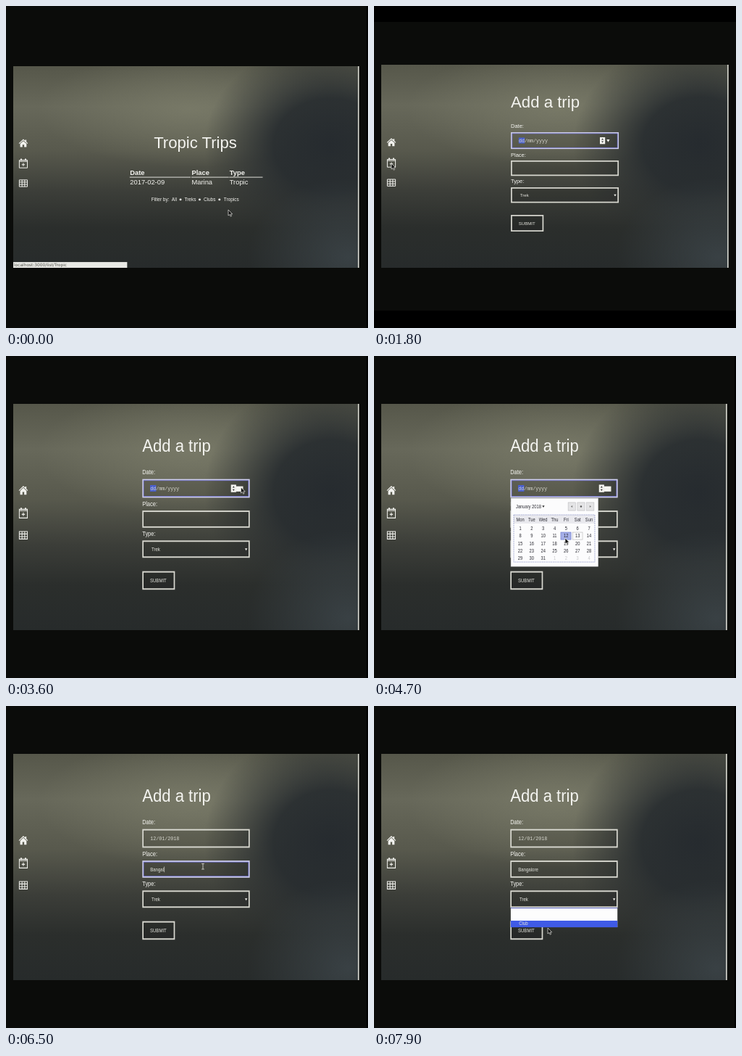
An HTML page for the animation above (8 s loop, 500 px wide and 444 px high).

```html
<!DOCTYPE html>
<html lang="en">
<head>
<meta charset="utf-8">
<title>Trip planner</title>
<style>
  html, body { margin: 0; width: 100%; height: 100%; overflow: hidden; background: #000; }
  svg { display: block; }
  text { font-family: "Liberation Sans", Arial, sans-serif; fill: #f4f4f0; white-space: pre; }
  .h1 { font-size: 22.2px; }
  .cell { font-size: 9.4px; }
  .head { font-size: 9.4px; font-weight: bold; }
  .small { font-size: 6.5px; }
  .label { font-size: 7.5px; }
  .value { font-size: 6.1px; fill: #e4e4de; }
  .mono { font: 6.7px "Liberation Mono", monospace; fill: #d6d6ce; }
  .status { font: 5.9px "DejaVu Sans", sans-serif; fill: #55564f; }
  .cal { font-size: 5.8px; fill: #2c2c34; }
  .mid { text-anchor: middle; }
  .box { fill: rgba(0,0,0,.1); stroke: #d9d9d1; stroke-width: 1.7; }
  .box.focus { stroke: #cfcfec; }
  .ring { fill: none; stroke: #6f70d2; stroke-width: .7; }
</style>
</head>
<body>
<svg width="500" height="444" viewBox="0 0 500 444">
  <defs>
    <linearGradient id="base" x2="0" y2="1">
      <stop offset="0" stop-color="#56574a"/><stop offset=".2" stop-color="#67685a"/>
      <stop offset=".42" stop-color="#58594d"/><stop offset=".62" stop-color="#3c3e39"/>
      <stop offset=".8" stop-color="#2b2e2c"/><stop offset="1" stop-color="#272b2b"/>
    </linearGradient>
    <radialGradient id="glow">
      <stop offset="0" stop-color="#7d7e6b" stop-opacity=".75"/>
      <stop offset="1" stop-color="#7d7e6b" stop-opacity="0"/>
    </radialGradient>
    <radialGradient id="shade">
      <stop offset="0" stop-color="#262b2f"/><stop offset=".45" stop-color="#272c2f" stop-opacity=".92"/>
      <stop offset="1" stop-color="#2a2e2f" stop-opacity="0"/>
    </radialGradient>
    <radialGradient id="cool">
      <stop offset="0" stop-color="#3b4347" stop-opacity=".9"/>
      <stop offset="1" stop-color="#3b4347" stop-opacity="0"/>
    </radialGradient>
  </defs>
  <rect id="back" width="500" height="444" fill="#0b0c0a"/>
  <svg id="video" viewBox="0 0 480 280" preserveAspectRatio="none">
    <rect width="480" height="280" fill="url(#base)"/>
    <ellipse cx="245" cy="60" rx="210" ry="80" fill="url(#glow)"/>
    <ellipse cx="440" cy="110" rx="175" ry="145" fill="url(#shade)"/>
    <ellipse cx="465" cy="265" rx="140" ry="110" fill="url(#cool)"/>
    <path d="M478.8 0V280" stroke="#d2d2ca" stroke-width="1.6"/>
    <g fill="#f2f2ee">
      <path d="M14 101.3L7.7 107l.8.8L14 103l5.500 4.800.8-.8-2.100-1.900V102.200h-1.700v1.400z"/>
      <path d="M14 103.900l-4.400 3.900v4.500h3.200v-3.300h2.400v3.300h3.200v-4.500z"/>
    </g>
    <g fill="none" stroke="#f2f2ee">
      <path d="M8.400 130.500h11.200v10.700H8.400zM8.400 132.200h11.200M14 134.500v4.400M11.800 136.700h4.400"/>
      <path d="M11 128.500v2.800M17 128.500v2.800" stroke-width="1.800"/>
      <path d="M8.400 158h11.200v9.300H8.400zM8.400 161h11.200M8.400 164.200h11.200M12.200 158v9.300M15.900 158v9.300"/>
    </g>
    <g id="list"></g>
    <g id="form"></g>
    <g id="calendar"></g>
    <g id="menu"></g>
    <g id="status">
      <rect y="272" width="158" height="8" fill="#e9e9e5"/>
      <text class="status" x="1" y="278">localhost:3000/list/Tropic</text>
    </g>
  </svg>
  <g id="cursor">
    <path id="arrow" d="M0 0V8L1.900 6.400 3.200 9.200 4.500 8.600 3.300 5.900H5.700Z" fill="#111" stroke="#e8e8e4" stroke-width=".7"/>
    <path id="beam" d="M-1.800-3.500H1.800M0-3.500V4M-1.800 4H1.800" fill="none" stroke="#d0d0ca" stroke-width=".9"/>
  </g>
</svg>
<script>
const $ = id => document.getElementById(id);
const text = (cls, x, y, s, id = '') => `<text class="${cls}" id="${id}" x="${x}" y="${y}">${s}</text>`;
const rect = (x, y, w, h, attrs) => `<rect x="${x}" y="${y}" width="${w}" height="${h}" ${attrs}/>`;
const field = (id, y, h, w = 147.3) => rect(179.9, y + .9, w, h - 1.8, `class="box" id="${id}"`);
const ring = (id, y, h) => rect(180.9, y + 1.9, 145.3, h - 3.8, `class="ring" id="${id}"`);

function buildList() {
  const cols = [['Date', '2017-02-09', 162, 246], ['Place', 'Marina', 247.500, 299], ['Type', 'Tropic', 300, 346]];
  const links = [['Filter by:', 191.5], ['All', 219.8], ['Treks', 237.5], ['Clubs', 264], ['Tropics', 292]];
  $('list').innerHTML = text('h1', 195, 114, 'Tropic Trips') +
    cols.map(([h, v, x, end]) => text('head', x, 151, h) + text('cell', x, 164.300, v) +
      `<path d="M${x - .5} 154.200H${end}" stroke="#e0e0da"/>`).join('') +
    links.map(([s, x]) => text('small', x, 187.2, s)).join('') +
    [232, 258.5, 286].map(x => `<circle cx="${x}" cy="185.200" r="1.500" fill="#f4f4f0"/>`).join('');
}

function buildForm() {
  $('form').innerHTML = text('h1', 179, 59, 'Add a trip') +
    text('label', 179, 87, 'Date:') + text('label', 179, 126.5, 'Place:') + text('label', 179, 163.3, 'Type:') +
    field('date', 93, 23.2) + ring('dateRing', 93, 23.2) +
    field('place', 132, 21.3) + ring('placeRing', 132, 21.3) +
    field('type', 169, 21.5) + field('submit', 207, 23, 43.5) +
    rect(189.8, 100.5, 8.4, 8, 'fill="#4a60cf" id="mark"') +
    text('mono', 190, 107, '', 'dateText') +
    `<g id="spin">${rect(302, 100, 7.2, 9.300, 'fill="#f4f4f0"')}
      <path d="M304 103.600l1.600-2 1.600 2zM304 105.600l1.600 2 1.600-2z" fill="#333"/>
      <path d="M311.300 103h4.200l-2.100 3.800z" fill="#f4f4f0"/></g>` +
    rect(309, 102, 9.8, 6.5, 'fill="#f4f4f0" id="hover"') +
    text('value', 190, 145, '', 'placeText') +
    '<path id="caret" d="M0 139.500V146.500" stroke="#e4e4de" stroke-width=".6"/>' +
    text('value', 191.8, 182, 'Trek') +
    '<path d="M321.300 178.800h3.400l-1.700 2.600z" fill="#f0f0ea"/>' +
    text('value', 189.700, 220.700, 'SUBMIT');
}

function buildCalendar() {
  const colX = i => 192.800 + 15.9 * i;
  const rowY = i => 156 + 9.33 * i;
  let s = rect(179.800, 116.7, 121.2, 84.5, 'fill="#fcfcfd" stroke="#b9b9bd" stroke-width=".5"') +
    text('cal', 186.800, 129, 'January 2018') + '<path d="M223.200 125.800h3.400l-1.700 2.600z" fill="#333"/>';
  [259.2, 272, 284.8].forEach((x, i) => {
    s += rect(x, 122, 10.3, 10, 'fill="#e4e4e6" stroke="#b4b4b8" stroke-width=".5"');
    s += i === 1 ? `<circle cx="${x + 5.1}" cy="127" r="1.200" fill="#555"/>`
      : `<path d="M${x + 5.1 + (i - 1) * 1.3} 127l${(1 - i) * 2.2}-1.400v2.800z" fill="#777"/>`;
  });
  s += rect(183.800, 137.3, 112.4, 10.7, 'fill="#e9e9ee"') +
    rect(183.800, 137.3, 112.4, 58.4, 'fill="none" stroke="#7f88c4" stroke-width=".7" stroke-dasharray="1.500 1"') +
    rect(249, 158.900, 14.2, 9, 'fill="#a5afe8" stroke="#6673c8" stroke-width=".6" id="pick"') +
    rect(265.6, 158.900, 13.6, 9, 'fill="none" stroke="#aaa" stroke-width=".5"');
  'Mon Tue Wed Thu Fri Sat Sun'.split(' ').forEach((d, i) => s += text('cal mid', colX(i), 145, d));
  for (let i = 0; i < 35; i++) {
    const day = i % 31 + 1;
    s += `<g opacity="${i > 30 ? .25 : 1}">${text('cal mid', colX(i % 7), rowY(Math.floor(i / 7)), day)}</g>`;
  }
  $('calendar').innerHTML = s;
}

function buildMenu() {
  $('menu').innerHTML = rect(179.6, 191, 148, 23.5, 'fill="#fdfdfd"') +
    rect(179.6, 206.4, 148, 8.2, 'fill="#3f5ae6" id="choice"') +
    text('value', 191, 212, 'Club', 'club') +
    '<path d="M179.600 190.800H327.600" stroke="#5b66d8" stroke-width=".8"/>';
}

// time, x, y
const path = [
  [0, 307, 281], [400, 307, 281], [600, 312, 350],
  [1200, 300, 345], [1600, 24, 217], [1900, 24, 217], [2300, 110, 205], [2700, 248, 208],
  [3100, 400, 118], [3200, 400, 118], [3600, 324.5, 181], [3700, 324.5, 181],
  [4100, 296, 226], [4200, 292, 230], [4500, 264, 251], [4800, 264, 251],
  [5100, 330, 124], [5400, 300, 216], [5500, 300, 216], [5700, 346, 232], [5800, 346, 232],
  [6000, 272, 221], [7000, 272, 221], [7100, 294, 226], [7300, 294, 226],
  [7600, 240, 272], [7700, 240, 272], [7900, 240, 306], [8000, 240, 306]
];
const typing = [[6100, 1], [6200, 2], [6300, 4], [6400, 5], [6500, 6], [6700, 7], [6800, 9]];

const show = (id, on) => $(id).style.display = on ? '' : 'none';

function cursorAt(t) {
  const i = path.findIndex(p => p[0] > t);
  const [t0, x0, y0] = path[i - 1], [t1, x1, y1] = path[i];
  const k = (t - t0) / (t1 - t0);
  return [x0 + (x1 - x0) * k, y0 + (y1 - y0) * k];
}

function place(id, x, y, w, h) {
  Object.entries({ x, y, width: w, height: h }).forEach(([k, v]) => $(id).setAttribute(k, v));
}

function render(t) {
  const within = (a, b) => t >= a && t < b;
  const wide = within(100, 2800);
  if (wide) { place('back', 0, 22, 500, 398); place('video', 10, 81, 480, 280); }
  else {
    place('back', 0, 0, 498, 444);
    if (t < 100) place('video', 10, 83, 478, 278);
    else place('video', 10, 66, 478, 312);
  }

  show('status', t < 500);
  show('list', t < 1800);
  show('form', t >= 1800);
  show('calendar', within(3700, 4800));
  show('pick', t >= 4500);
  show('menu', t >= 7800);
  show('choice', t >= 7900);
  show('club', t >= 7900);

  const onDate = t < 6000, onPlace = within(6000, 7800);
  $('date').classList.toggle('focus', onDate);
  $('place').classList.toggle('focus', onPlace);
  show('dateRing', onDate);
  show('placeRing', onPlace);
  show('spin', onDate);
  show('hover', within(3500, 4800));
  show('mark', t < 4800);
  $('dateText').textContent = t < 4800 ? 'dd/mm/yyyy' : '12/01/2018';

  const step = typing.filter(k => k[0] <= t).pop();
  $('placeText').textContent = 'Bangalore'.slice(0, step ? step[1] : 0);
  show('caret', within(6000, 6800));
  if (onPlace) {
    const end = 190.5 + $('placeText').getComputedTextLength();
    $('caret').setAttribute('transform', `translate(${end})`);
  }

  const [x, y] = cursorAt(t);
  const beam = within(5900, 7500);
  $('cursor').setAttribute('transform', `translate(${x} ${y})`);
  show('cursor', !within(700, 1200));
  show('beam', beam);
  show('arrow', !beam);
}

buildList();
buildForm();
buildCalendar();
buildMenu();

const start = performance.now();
function tick(now) {
  const t = Math.max(0, now - start) % 8000;
  render(Math.floor(t / 100) * 100);
  requestAnimationFrame(tick);
}
render(0);
requestAnimationFrame(tick);
</script>
</body>
</html>
```
